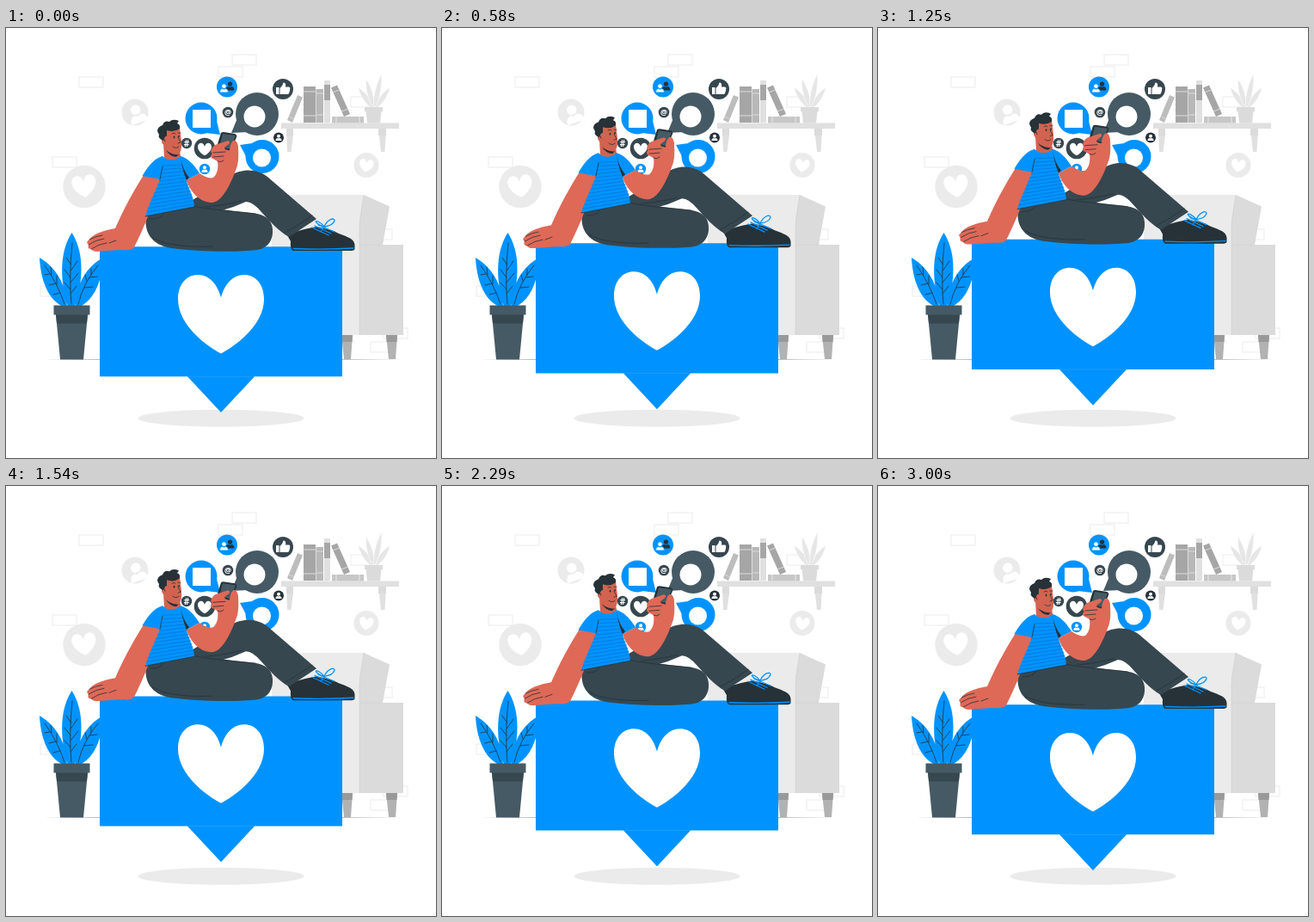
Animation of 500x500 px, one loop 3040 ms. Source, as an HTML page:

```html
<!DOCTYPE html>
<html lang="en">
<head>
<meta charset="utf-8">
<style>
html, body { margin: 0; width: 100%; height: 100%; overflow: hidden; background: #fff }
svg { display: block; width: 100vw; height: 100vh }
text { font-family: "Open Sans", Arial, sans-serif; font-weight: 700; fill: #fff; text-anchor: middle }
.blue { fill: #0093ff } .dark { fill: #37474f } .slate { fill: #455a64 } .ink { fill: #263238 } .white { fill: #fff }
.skin { fill: #de6957 } .face { fill: #d36350 }
.pale { fill: #ebebeb } .light { fill: #e0e0e0 } .grey { fill: #dbdbdb } .mid { fill: #a6a6a6 }
.line { fill: none; stroke: #263238; stroke-width: .8; stroke-linecap: round; stroke-linejoin: round }
.lace { fill: none; stroke: #0093ff; stroke-width: 1.3; stroke-linecap: round }
</style>
</head>
<body>
<svg viewBox="0 0 500 500">
<defs>
  <path id="heart" d="M0 46C-14 39-50 14-50-17C-50-36-39-45.500-27-45.500C-13-45.500-4-34 0-19C4-34 13-45.500 27-45.500C39-45.500 50-36 50-17C50 14 14 39 0 46Z"/>
  <g id="user"><circle cy="-3.2" r="3.6"/><path d="M-6.5 6.5C-6.5 2-4 .8-2 .8Q0 2.4 2 .8C4 .8 6.5 2 6.5 6.5Z"/></g>
  <path id="leaf" d="M0 0C-11-22-13-50 0-85C13-50 11-22 0 0Z"/>
</defs>

<g id="bricks" fill="none" stroke="#ebebeb"></g>

<!-- grey badges -->
<circle class="pale" cx="150" cy="98" r="15.500"/>
<use href="#user" class="white" transform="translate(152.500 100) scale(1.6) rotate(-20)"/>
<circle class="pale" cx="91" cy="184.500" r="24.700"/>
<use href="#heart" class="white" transform="translate(91 184) rotate(-8) scale(.28)"/>
<circle class="pale" cx="419" cy="159.500" r="14.500"/>
<use href="#heart" class="white" transform="translate(419 160) rotate(8) scale(.165)"/>

<!-- shelf -->
<path class="light" d="M320 110.500H457V117H320ZM326 117H334V125L331.500 144H327ZM433 117H442L440.500 144H436Z"/>
<path class="grey" d="M326 117H334V125H326ZM433 117H442V125H433Z"/>
<path fill="#bdbdbd" d="M327 107L339 78L345 80.500L333 110Z"/>
<path class="mid" d="M346 68H360V110H346Z"/>
<path fill="#b8b8b8" d="M360.500 71H369V110H360.500Z"/>
<path class="light" d="M370 61H377V110H370Z"/>
<path class="mid" d="M370 66H377V84H370ZM378 69.500L385 66.500L400 100L393 103Z"/>
<path d="M346 74H360M346 102H360M360.500 76H369M360.500 101H369M380 75L387.500 72M390 97L397.500 94M329 103L335 106" stroke="#dbdbdb" fill="none"/>
<path fill="#c7c7c7" d="M379 103H416V110.500H379Z"/>
<path d="M384 103V110M411 103V110" stroke="#e8e8e8"/>
<g fill="#e6e6e6" stroke="#fff" stroke-width="1.200">
  <use href="#leaf" transform="translate(427 94) rotate(-35) scale(.36)"/>
  <use href="#leaf" transform="translate(429 94) rotate(35) scale(.36)"/>
  <use href="#leaf" transform="translate(428 94) rotate(-15) scale(.35 .43)"/>
  <use href="#leaf" transform="translate(428 94) rotate(12) scale(.35 .49)"/>
</g>
<path class="grey" d="M417 92H438V97H436.500L435 110.500H420L418.500 97H417Z"/>

<!-- armchair -->
<path fill="#b2b2b2" d="M390 357H403L401 385H393ZM442 357H455L453 385H445Z"/>
<path fill="#999" d="M390 357H403L402.500 365H390ZM442 357H455L454.500 365H442.500Z"/>
<path class="pale" d="M316 194H416L412 357H309V215Q310 198 316 194Z"/>
<path class="grey" d="M416 194L446 207.500L438 252H462V357H411V222Z"/>
<path d="M411 357V230L416 194M411 252H438" stroke="#d2d2d2" stroke-width=".7" fill="none"/>

<path class="ink" d="M42 385.300L250 384.900L458 385.300L250 385.900Z"/>

<!-- floor plant -->
<path class="blue" d="M39 267C40 292 49 317 67 324L71 324C70 302 62 281 39 267ZM113 267C94 277 81 298 81 324H86C104 315 112 292 113 267ZM76.500 238C64 257 61 288 72 324H80C92 288 89 257 76.500 238Z"/>
<path class="line" d="M45 276Q60 297 68 321M53 287L52 278M59 298V288M51 286L45 287M58 297L50 299M63 308L55 310M107 276Q90 296 84 321M99 287V280M94 294L92 287M97 290L106 289M91 302L101 301M77 250Q73 290 76 321M75.500 275L70 267M75 290L68 281M75 304L68 296M75.500 282L83 271M75 296L84 285M75 309L82 300"/>
<path class="slate" d="M58 333H95L90 385.500H63Z"/>
<path class="dark" d="M58 333H95L94 343.500H59Z"/>
<path class="slate" d="M55.500 322.500H97.500V333.500H55.500Z"/>

<ellipse class="pale" cx="250" cy="453.700" rx="96.500" ry="10"/>

<!-- floating badges -->
<circle class="blue" cx="257" cy="68.500" r="12"/>
<use href="#user" class="ink" transform="translate(260.500 67.500) scale(.75)"/>
<use href="#user" class="white" stroke="#0093ff" transform="translate(253.500 70) scale(.75)"/>
<circle class="dark" cx="322" cy="71" r="12"/>
<path class="white" d="M314 69H317.500V77H314ZM318.500 70Q322 67 322.500 63.500Q326 63.500 325 68.500H329Q331 69 330 71.500Q330.500 73 329.500 74Q329.500 77 327 77H318.500Z"/>
<circle class="blue" cx="227" cy="105" r="18.500"/>
<path class="blue" d="M245 108L249 124L232 122Z"/>
<path class="white" d="M217 95H238V116H217Z"/>
<circle class="dark" cx="258" cy="98" r="6.300"/><text x="258" y="101" font-size="9">@</text>
<circle class="slate" cx="292" cy="100" r="25"/>
<path class="slate" d="M269 105L262 122L281 121Z"/>
<circle class="white" cx="289" cy="103" r="12.500"/>
<circle class="blue" cx="298" cy="149.500" r="19.500"/>
<path class="blue" d="M286 134L272 136L280 151Z"/>
<circle class="white" cx="297.500" cy="151" r="10.500"/>
<circle class="ink" cx="317" cy="127.500" r="6"/>
<use href="#user" class="white" transform="translate(317 127.500) scale(.55)"/>
<circle class="dark" cx="210" cy="134" r="6.200"/><text x="210" y="137.600" font-size="10">#</text>
<circle class="dark" cx="231" cy="140" r="12.300"/>
<use href="#heart" class="white" transform="translate(231 141) scale(.16)"/>
<circle class="blue" cx="231" cy="164" r="6.200"/>
<use href="#user" class="white" transform="translate(231 164) scale(.56)"/>

<g id="float">
  <path class="blue" d="M109 254.200H391V405.300H289L250 447L211 405.300H109Z"/>
  <path d="M211 405.300H289" stroke="#3aa9ff" stroke-width=".5"/>
  <use href="#heart" class="white" transform="translate(250 332.500)"/>

  <!-- shoe and bent leg -->
  <path class="ink" d="M327 241C336 236 350 233 362 231L381 236C391 242 405 243 405.500 252V257Q405 259 400 259H334Q330 257 331 248Z"/>
  <path class="lace" d="M334 256.500Q370 258 404 256" stroke-width=".8"/>
  <path class="lace" d="M356 232L375 241M359 230L378 239M363 229L382 237M370 231C360 228 358 223 363 225Q367 227 370 231C374 222 382 220 382 224Q380 230 370 231L366 237"/>
  <path class="dark" d="M205 206C232 194 252 173 271 167C284 163 297 167 304 173L361 222L329 243C317 236 306 224 297 214Q287 202 279 202Q264 209 248 213Z"/>
  <path class="line" d="M324 238Q340 230 356 218M222 209Q250 207 274 201"/>
  <!-- resting leg -->
  <path class="dark" d="M163 217C160 236 168 252 192 256C220 260 270 261 292 258C305 256 311 246 310 234C309 221 299 216 284 215C258 212 236 210 218 205Z"/>
  <path class="line" d="M218 207C240 212 268 213 290 216M171 244C185 253 215 255 240 254M168 222Q180 222 183 216"/>

  <!-- supporting arm -->
  <path class="skin" d="M160 171L181 175C172 202 161 232 149 255Q145 259 132 258L111 259.500Q101 261 99 257Q94 257 96 252Q92 249 97 246C100 240 114 235 127 233C137 210 148 190 160 171Z"/>
  <path class="line" d="M97 246Q105 242 112 241M96 252Q105 246 114 245M99 257Q108 251 117 250M120 250L128 247" stroke-width=".7"/>

  <!-- neck and shirt -->
  <path class="face" d="M183 134L202 143L204 154Q194 160 184 151Z"/>
  <path class="ink" d="M186 142Q193 148 201 147L198 150Q190 149 186 142Z"/>
  <path class="blue" d="M182 149C171 152 164 163 158.500 172L179 176C174 190 166 204 162 219L219 208C218 195 212 187 210 177L225 169C218 158 211 151 203 149Q192 158 182 149Z"/>
  <g id="stripes" fill="none" stroke="#086fc2" stroke-width=".6"></g>
  <path class="ink" d="M203 151Q205 164 213 174L210 177Q205 165 203 151Z"/>
  <path class="line" d="M179 176L182 161M162 219L219 208" stroke-width=".5"/>

  <!-- phone arm -->
  <path class="skin" d="M210 177L225 169Q235 176 241 174C246 170 247 162 246 155L239 151Q237 147 241 146Q238 142 242 140L252 136L264 130Q270 132 270 140Q271 151 269 160C263 178 252 202 240 203C227 203 215 193 210 177Z"/>
  <path class="ink" d="M250 122Q251 121 253 121L266 123Q269 124 268 127L262 141Q261 143 258 142L247 139Q245 138 246 135Z"/>
  <path class="slate" d="M252 123L267 125L261 141L248 138Z"/>
  <path class="skin" d="M239 141Q241 136 246 135L258 131Q262 132 259 135L254 139L257 147Q258 150 253 149L254 153Q252 156 246 154L239 151Q237 148 240 146Q237 144 239 141ZM260 143Q260 135 264 131Q269 129 270 140L267 154Z"/>
  <path class="line" d="M241 145L255 144M241 150L253 149M246 155Q250 157 253 154" stroke-width=".6"/>

  <!-- head -->
  <path class="face" d="M184 119Q191 113 202 116L204 132Q205 144 200 147Q191 148 185 137Q180 134 181 129Q181 125 185 126Z"/>
  <path class="ink" d="M176 120Q176 115 182 113Q184 107 190 109Q194 105 201 108L199 111Q203 112 202 117Q195 122 187 119L187 126Q185 125 183 131Q176 128 178 124Z"/>
  <path class="line" d="M193 123Q195 121 197 123M200 122L203 122M200 127L203 133L200 134M194 138Q198 141 201 138M183 129Q185 129 185 132"/>
  <ellipse class="ink" cx="195.500" cy="127" rx=".9" ry="1.400"/>
  <ellipse class="ink" cx="201" cy="126" rx=".8" ry="1.300"/>
</g>
</svg>
<script>
const $ = id => document.getElementById(id);
const bricks = [[85, 57], [263, 31], [247, 45], [54, 150], [40, 300], [424, 365], [439, 349], [401, 80], [421, 234]];
$('bricks').innerHTML = bricks.map(([x, y]) => `<rect x="${x}" y="${y}" width="28" height="12"/>`).join('');

let stripes = '';
for (let y = 160; y < 218; y += 4.5) {
  const left = y < 176 ? 182 - (y - 160) / 5 : 179 - (y - 176) * .4;
  const right = y < 176 ? 204 + (y - 160) / 2.6 : 210 + (y - 176) * .26;
  stripes += `<path d="M${left} ${y}L${right} ${y - (y - 155) * .16}"/>`;
}
$('stripes').innerHTML = stripes;

// The figure rises and sinks evenly, then rests briefly before the loop restarts.
const LOOP = 3040, MOVE = 3000, RISE = 10;
const start = performance.now();
function draw() {
  const p = Math.min(1, (performance.now() - start) % LOOP / MOVE);
  const lift = RISE * (1 - Math.abs(1 - 2 * p));
  $('float').setAttribute('transform', `translate(0 ${-lift})`);
  requestAnimationFrame(draw);
}
draw();
</script>
</body>
</html>
```
